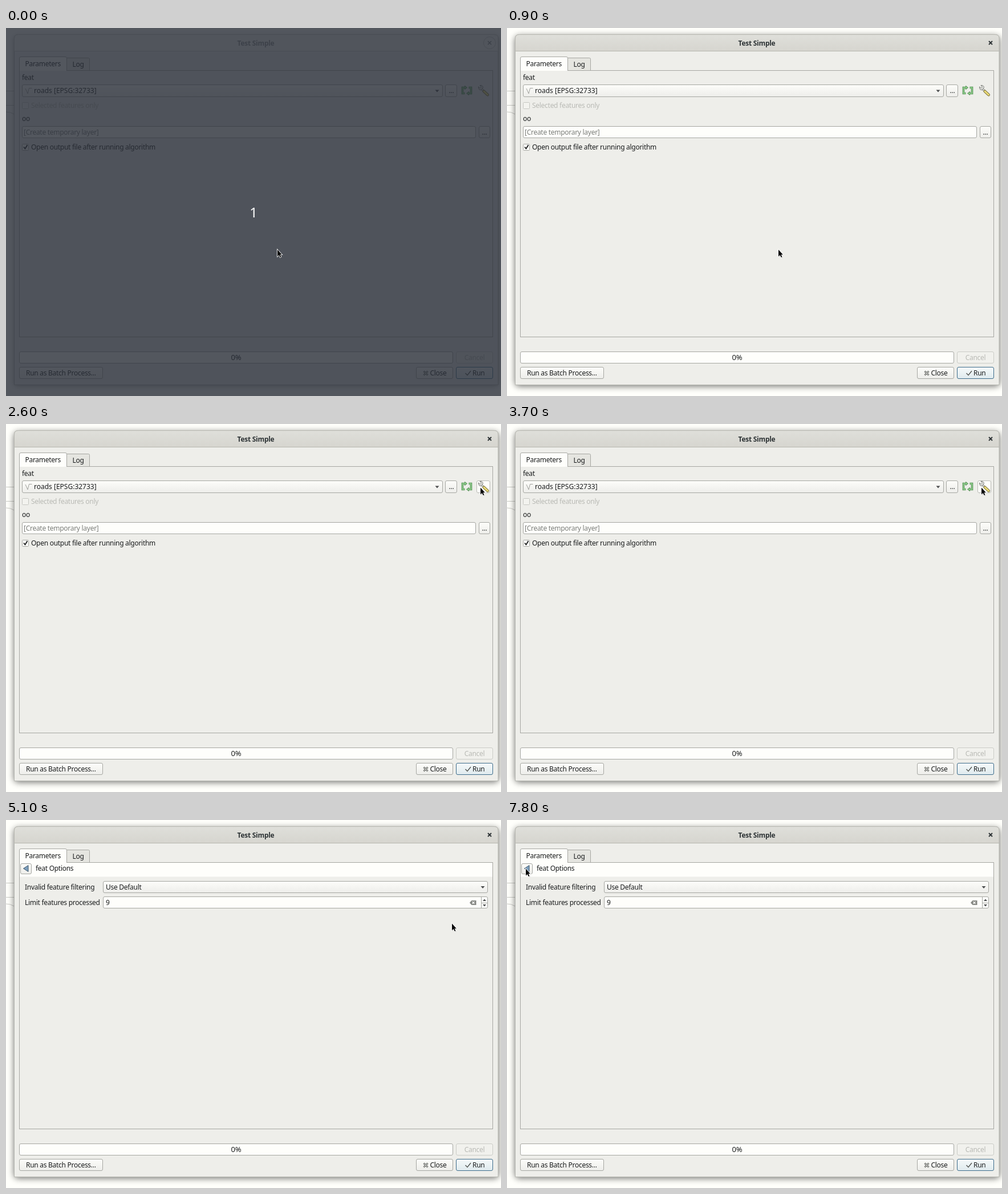
Write an HTML page that moves like this. It is 868 by 645 pixels and loops after 8 s.

```html
<!DOCTYPE html>
<html lang="en">
<head>
<meta charset="utf-8">
<title>Tool dialog</title>
<style>
  html, body { margin: 0; width: 100%; height: 100%; overflow: hidden; background: #fffffb; }
  svg { display: block; width: 868px; height: 645px; }
  text { font: 12px "Noto Sans", "Open Sans", sans-serif; letter-spacing: -.28px; white-space: pre; }
</style>
</head>
<body>
<svg id="stage" viewBox="0 0 868 645" xmlns="http://www.w3.org/2000/svg"></svg>
<script>
const INK = '#1a1c1d', LINE = '#a6a7a2', FAINT = '#b9bab5', BODY = '#eeeeea', LIGHT = '#fefefb';

const box = (x, y, x2, y2, fill = 'url(#button)', stroke = LINE, r = 2.5) =>
  `<rect x="${x + .5}" y="${y + .5}" width="${x2 - x - 1}" height="${y2 - y - 1}" rx="${r}" fill="${fill}" stroke="${stroke}"/>`;
const label = (x, middle, words, fill = INK, extra = '') =>
  `<text x="${x}" y="${middle + 4}" fill="${fill}" ${extra}>${words}</text>`;
const path = (d, stroke, width = 1, fill = 'none', extra = '') =>
  `<path d="${d}" stroke="${stroke}" stroke-width="${width}" fill="${fill}" ${extra}/>`;
const group = (id, content) => `<g id="${id}">${content}</g>`;
const gradient = (id, from, to) =>
  `<linearGradient id="${id}" x2="0" y2="1"><stop stop-color="${from}"/><stop offset="1" stop-color="${to}"/></linearGradient>`;
const blur = (id, size) =>
  `<filter id="${id}" x="-10%" y="-10%" width="120%" height="120%"><feGaussianBlur stdDeviation="${size}"/></filter>`;

const centered = 'text-anchor="middle"';
const titleStyle = 'text-anchor="middle" style="font-weight:700"';
const titleShape = 'M14.5 40.5V18q0-6.5 7-6.5H856q7 0 7 6.5v22.5z';
const cross = (color, width) => path('M845 23l6 6m0-6l-6 6', color, width);
const dropArrow = (x, y) => path(`M${x - 3.5} ${y - 1.5}h7l-3.5 4z`, 'none', 0, '#4b4d4e');
const dots = (x, y) => label(x, y, '...', INK, centered);
const toolButton = (id, x) => group(id, box(x, 99, x + 24, 121, LIGHT, '#b9bab5'));

const brackets = 'M805 104.500h-4.500v10h4M811 114.500h4.500v-10h-4';
const iterateIcon =
  path(brackets, '#4f8a50', 3.600) +
  path('M804.500 101.500l4 3-4 3zM811.500 111.500l-4 3 4 3z', '#4f8a50', 1, '#8fce8c') +
  path(brackets, '#8fce8c', 1.800);

const wrenchIcon =
  path('M833 106l5 5', '#777975', 3.600) + path('M833 106l5 5', '#e2e3df', 1.800) +
  path('M838 111l6.500 6', '#7d7440', 5, 'none', 'stroke-linecap="round"') +
  path('M838 111l6.500 6', '#ecdc78', 3, 'none', 'stroke-linecap="round"') +
  path('M828.500 103l3 2.500 2-2-2.500-3q4-.500 5 2t-1 4l-2.500 2q-4 .500-4-5.500z', '#777975', 1, '#e2e3df');

const mainPage =
  label(28, 87, 'feat') +
  box(28, 99, 766, 121) + path('M34 106l4 9 2.500-9.500h5', '#a0a19d') +
  label(49, 110, 'roads [EPSG:32733]', INK, 'style="letter-spacing:0"') + dropArrow(756, 110) +
  box(770, 99, 791, 121) + dots(781, 110) +
  toolButton('iterateHover', 796) + iterateIcon + toolButton('wrenchHover', 825) + wrenchIcon +
  box(28, 130, 40, 142, '#f3f3ef', '#c6c7c2', 1) + label(44, 136, 'Selected features only', FAINT) +
  label(28, 159, 'oo') +
  box(28, 172, 824, 193, LIGHT) + label(31, 182.500, '[Create temporary layer]', '#7c7e7b') +
  box(829, 172, 849, 193) + dots(839, 182.500) +
  box(28, 203, 40, 215, LIGHT, LINE, 1) + path('M31 208.500l2.500 3 4-6.500', INK, 1.800) +
  label(44, 208.500, 'Open output file after running algorithm');

const optionsPage =
  `<rect x="24" y="75" width="829" height="24.500" fill="${LIGHT}"/>` +
  box(25, 76, 45, 95) + path('M39 79.500v11l-8.500-5.500z', '#3f566b', 1, '#7d9fbd') +
  label(52, 85, 'feat Options') +
  label(33, 117.500, 'Invalid feature filtering') +
  box(170, 107, 845, 128) + label(175, 117.500, 'Use Default') + dropArrow(836, 117.500) +
  label(33, 145, 'Limit features processed') +
  box(170, 134, 845, 155, LIGHT) + label(175, 145, '9') +
  path('M833.500 135v19M834 145.500h10', LINE) +
  path('M813 145l3.500-4h8v8h-8z', 'none', 0, '#858783') + path('M817.500 143l4 4m0-4l-4 4', LIGHT, 1.300) +
  path('M836 142l3-3.500 3 3.500zM836 148l3 3.500 3-3.500z', 'none', 0, '#4b4d4e');

const windowFrame =
  path('M0 110.500h14M0 135.500h14M0 147q8 0 14 4', '#c9cac5') +
  `<rect id="shadow" x="14" y="14" width="850" height="614" rx="7" fill="#000"/>` +
  path('M14.500 625.500V18q0-6.500 7-6.500H856q7 0 7 6.500v607.500z', '#b5b6b0', 1, BODY) +
  group('inactiveTitle', path(titleShape, '#cfd0cb', 1, '#f4f4f0') + label(438, 27, 'Test Simple', '#8f9190', titleStyle) +
    '<circle cx="848" cy="26" r="10.500" fill="#f6f6f3" stroke="#c9cac5"/>' + cross('#8f9190', 1.600)) +
  group('activeTitle', path(titleShape, '#b7b7b0', 1, 'url(#title)') + label(438, 27, 'Test Simple', '#2e3436', titleStyle) +
    cross('#2e3436', 2));

const dialogBody =
  box(23, 74, 854, 542, BODY, LINE, 0) +
  path('M106.500 74V52.500h38q2 0 2 2V74', LINE, 1, '#e5e5e0') + label(126.500, 64, 'Log', INK, centered) +
  path('M23.500 75V53q0-2.500 2.500-2.500h78q2.500 0 2.500 2.500V75', LINE, 1, LIGHT) + label(33.500, 63, 'Parameters') +
  group('mainPage', mainPage) + group('optionsPage', optionsPage) +
  box(23, 567, 784, 588, LIGHT) + label(403.500, 578, '0%', INK, centered + ' style="font-size:13px;letter-spacing:0"') +
  box(789, 567, 854, 588, '#f1f1ed', '#cbccc7') + label(821.500, 578, 'Cancel', FAINT, centered) +
  box(23, 594, 170, 615) + label(35, 605, 'Run as Batch Process...') +
  box(719, 594, 784, 615) + path('M732.500 601.500l7 7m0-7l-7 7', '#6f716e', 3) +
  path('M732.500 601.500l7 7m0-7l-7 7', '#d8d8d4', 1) + label(743.500, 605, 'Close') +
  box(789, 594, 854, 615, 'url(#primary)', '#3d6c8b') + path('M805.500 605l3.500 3.500 6-7.500', '#50524f', 1.300) + label(818, 605, 'Run');

const tooltip = box(723, 113, 834, 149, '#30343a', '#24272b', 4) +
  label(778.500, 131, 'Advanced options', '#fff', centered);

const countdown = '<rect width="868" height="645" fill="#292e37" fill-opacity=".8"/>' +
  '<text x="434" y="331.500" fill="#fff" text-anchor="middle" style="font-size:24px;letter-spacing:0">1</text>';

const arrow = 'M1 1.500V13.500L3.700 11 5.700 15 7.500 14.200 5.600 10.300H8.900Z';
const pointer = path(arrow, 'none', 0, '#000', 'opacity=".25" transform="translate(1 1)"') +
  path(arrow, '#fff', 1.600) + path(arrow, 'none', 0, '#080808');

document.getElementById('stage').innerHTML =
  `<defs>${gradient('button', '#fdfdfa', '#ededea')}${gradient('primary', '#f6fafa', '#dfeaee')}` +
  `${gradient('title', '#dfdfda', '#d6d5cf')}${blur('soft', 4)}${blur('deep', 6)}</defs>` +
  windowFrame + dialogBody + group('tooltip', tooltip) + group('countdown', countdown) + group('pointer', pointer);

// Each move: time of its first step, number of steps, destination.
const STEP = 100;
const moves = [
  [1400, 9, 808, 116],
  [2300, 4, 831, 110],
  [4600, 1, 826, 118],
  [4800, 1, 800, 157],
  [5000, 2, 781, 180],
  [6800, 3, 642, 232],
  [7200, 7, 32, 84]
];

function pointerAt(t) {
  let x = 475, y = 387;
  for (const [start, steps, toX, toY] of moves) {
    if (t < start) break;
    const p = Math.min(1, (Math.floor((t - start) / STEP) + 1) / steps);
    const eased = p * p * (3 - 2 * p);
    x += (toX - x) * eased;
    y += (toY - y) * eased;
  }
  return [Math.round(x), Math.round(y)];
}

const el = id => document.getElementById(id);
const show = (id, on) => el(id).setAttribute('visibility', on ? 'inherit' : 'hidden');

function draw(t) {
  const [x, y] = pointerAt(t);
  const active = t >= 900, options = t >= 4000;
  const over = left => x >= left && x < left + 24 && y >= 99 && y < 121;
  const pressed = t >= 3600 && t < 3700;

  show('countdown', t < 100);
  show('inactiveTitle', !active);
  show('activeTitle', active);
  el('shadow').setAttribute('filter', active ? 'url(#deep)' : 'url(#soft)');
  el('shadow').setAttribute('opacity', active ? .55 : .3);
  show('mainPage', !options);
  show('optionsPage', options);
  show('iterateHover', !options && over(796));
  show('wrenchHover', !options && over(825));
  el('wrenchHover').firstChild.setAttribute('fill', pressed ? '#d6d6d1' : LIGHT);
  show('tooltip', t >= 3200 && t < 3600);
  el('pointer').setAttribute('transform', `translate(${x} ${y})`);
}

const begin = performance.now();
function tick() {
  draw((performance.now() - begin) % 8000);
  requestAnimationFrame(tick);
}
tick();
</script>
</body>
</html>
```
